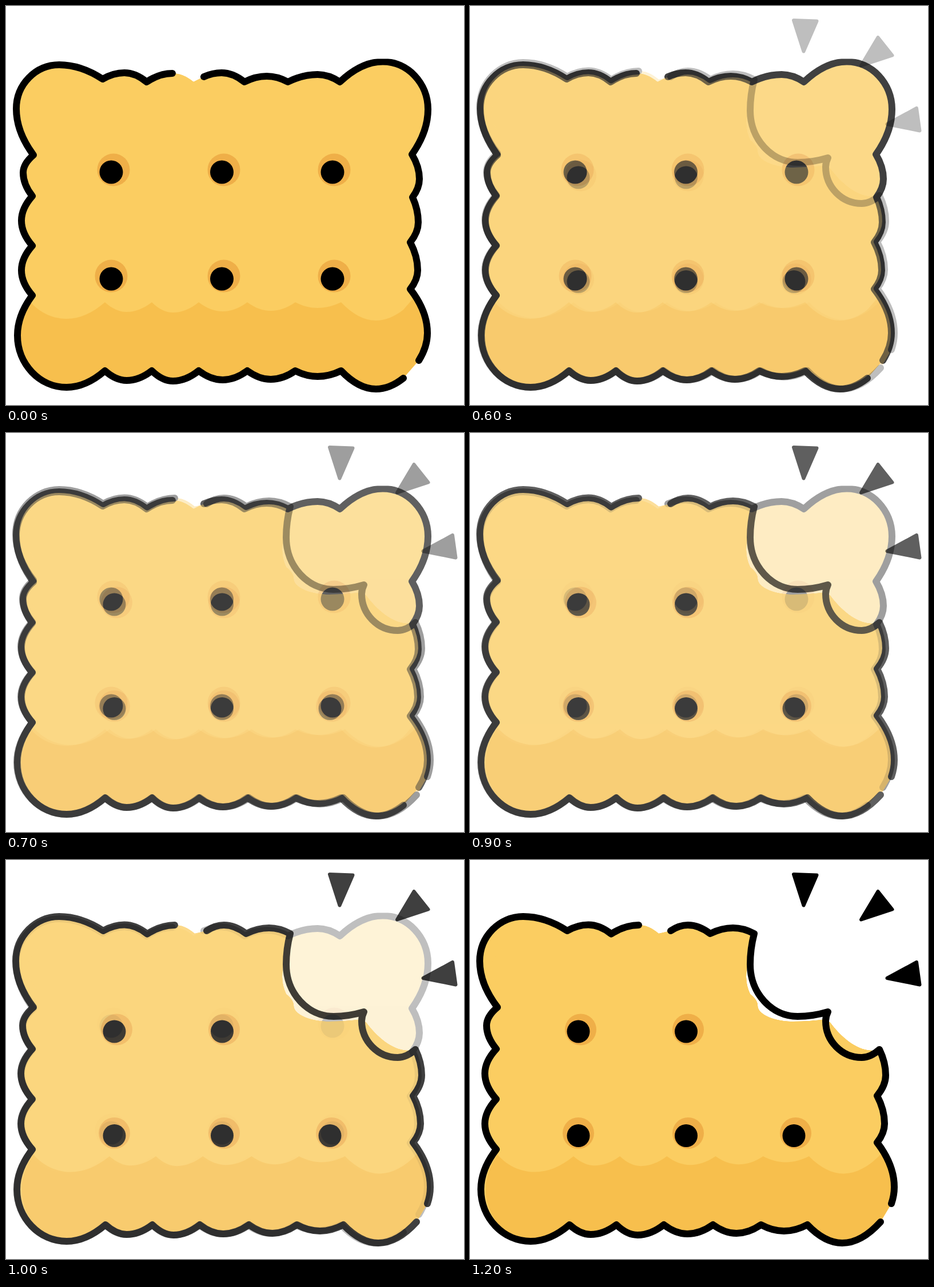
An HTML page that plays this animation: 801x699 px, repeating every 1700 ms.

```html
<!DOCTYPE html>
<html lang="en">
<head>
<meta charset="utf-8">
<title>Biscuit bite</title>
<style>
  html, body { margin: 0; height: 100%; overflow: hidden; background: #fff; }
  svg { display: block; width: 100%; height: 100%; }
  .line { fill: none; stroke: #000; stroke-width: 12; stroke-linecap: round; stroke-linejoin: round; }
  .light { fill: #fbcd61; }
  .dark { fill: #f7bf4d; }
  .halo { fill: #efaf48; }
  .spark { stroke: #000; stroke-width: 6; stroke-linejoin: round; }
</style>
</head>
<body>
<svg id="stage" viewBox="0 0 801 699">
  <clipPath id="crop"><rect y="92.5" width="801" height="585"/></clipPath>
</svg>
<script>
// Outline points: plain = corner, h / v = extremum with a horizontal / vertical tangent.
const whole = {
  id: "whole",
  left: `h291,118 246,133 h207,117 169,128 h93,103 v18,180 48,261 v30,292 46,333 v27,376 46,420
    v27,463 46,507 v20,577 h106,668 173,639 h211,656 255,639 h292,657 337,639 h379,655 422,639
    h463,654 506,639 h545,649 586,639 h647,671 695,652`,
  right: "722,621 v737,573 707,496 v720,463 707,414 v721,379 711,335",
  edge: "711,335 v723,303 710,260 v738,181 h659,97.5 584,133 h545,120 493,133",
  top: "493,133 h456,123 417,133 h377,117 346,124",
  notch: "h291,118 328,133 346,124",
  shade: "", shadeTop: "translate(0 -120)",
  halo: 28.5, hole: 20.5,
  halos: [[188, 287], [381, 287], [574, 287], [184, 473], [381, 473], [574, 473]],
  holes: [[184, 291], [377.5, 291], [571, 291], [184, 478], [377.5, 478], [571, 478]],
  sparks: []
};
const bitten = {
  id: "bitten",
  left: `h295,114 247,129.5 h207,113.5 170,124 h93,99 v17,177 48,258 v29,290 46,331 v26,374 46,419
    v26,462 46,507 v19,577 h106,668 174,639 h211,656 256,639 h293,657 339,639 h380,655 425,639
    h466,654 509,639 h549,650 590,639 h651,671 718,634`,
  right: "737,602 v742,573 712,495 v725,462 712,413 v727,377 716,332",
  edge: "716,332 h685,346 v622,282 626,266 h573,274 v490,183 497,129",
  fillEdge: "716,332 h705,334 630,285 622,279 h565,283 v503,255 490,235 v483,205 486,180 497,129",
  top: "497,129 h460,119 420,129 h381,114 351,124",
  notch: "h295,114 330,129 351,124",
  shade: "translate(8.7 0) scale(.99 1)", shadeTop: "translate(8.7 -88) scale(.99 .95)",
  halo: 27.5, hole: 20,
  halos: [[193.5, 297], [381.5, 297], [189.5, 478.5], [381.5, 478.5], [569.5, 478.5]],
  holes: [[189.5, 300.5], [378, 300.5], [189.5, 483], [378, 483], [566.5, 483]],
  sparks: ["566,25 606.5,26.5 583.5,79.5", "713.5,55 738.5,86.5 684,104.5", "781,179 786.5,218.5 729.5,207"]
};

const parse = text => text.trim().split(/\s+/).map(token => {
  const kind = /[hv]/.test(token[0]) ? token[0] : "";
  const [x, y] = token.slice(kind.length).split(",").map(Number);
  return { kind, x, y };
});

// Curve between two points; control points are fractions of the way across.
function curve(a, b) {
  if (!a.kind && !b.kind) return `L${b.x},${b.y}`;
  const k = a.kind && b.kind ? .55 : 1 / 3;
  const from = a.kind === "h" ? [k, 0] : a.kind === "v" ? [0, k]
    : b.kind === "h" ? [k, 2 * k] : [2 * k, k];
  const to = b.kind === "h" ? [1 - k, 1] : b.kind === "v" ? [1, 1 - k]
    : a.kind === "h" ? [2 * k, k] : [k, 2 * k];
  const at = ([u, v]) => `${a.x + (b.x - a.x) * u},${a.y + (b.y - a.y) * v}`;
  return `C${at(from)} ${at(to)} ${b.x},${b.y}`;
}

function trace(text, start = "M") {
  const points = parse(text);
  return `${start}${points[0].x},${points[0].y}` +
    points.slice(1).map((p, i) => curve(points[i], p)).join("");
}

const circles = (list, r, name) =>
  list.map(([x, y]) => `<circle class="${name}" cx="${x}" cy="${y}" r="${r}"/>`).join("");

function biscuit(b) {
  const sides = start => trace(b.left) + trace(b.right, start);
  // The notch runs left to right, so it is closed by its own small shape.
  const body = sides("L") + trace(b.fillEdge || b.edge, "L") + trace(b.top, "L") + "Z";
  const notch = trace(b.notch) + "Z";
  const line = sides("M") + trace(b.edge, "L") + trace(b.top, "L");
  const [gapLeft, dip, gapRight] = parse(b.notch);
  const crest = { kind: "", x: dip.x, y: dip.y };
  const filled = body.replace(/Z$/, "") +
    curve(gapRight, { ...crest }) + curve(crest, gapLeft) + "Z";
  return `<g id="${b.id}">
    <clipPath id="${b.id}-clip"><path d="${filled}"/></clipPath>
    <g clip-path="url(#${b.id}-clip)">
      <rect class="light" width="801" height="699"/>
      <path class="dark" d="${filled}" transform="${b.shade}"/>
      <rect class="light" width="801" height="460"/>
      <path class="light" d="${filled}" transform="${b.shadeTop}"/>
    </g>
    ${circles(b.halos, b.halo, "halo")}${circles(b.holes, b.hole, "hole")}
    <path class="line" d="${line}"/>
    ${b.sparks.map(p => `<polygon class="spark" points="${p}"/>`).join("")}
  </g>`;
}

const stage = document.getElementById("stage");
stage.innerHTML += `<g clip-path="url(#crop)">${biscuit(whole)}</g>` + biscuit(bitten);
const before = document.getElementById("whole");
const after = document.getElementById("bitten");

// Cross-fade in eight hard steps of 100 ms after half a second.
function draw(now) {
  const t = now % 1700;
  const mix = Math.max(0, Math.min(8, Math.floor((t - 400) / 100))) / 8;
  before.setAttribute("opacity", 1 - mix);
  after.setAttribute("opacity", mix);
}

const startTime = performance.now();
function tick() {
  draw(performance.now() - startTime);
  requestAnimationFrame(tick);
}
tick();
</script>
</body>
</html>
```
